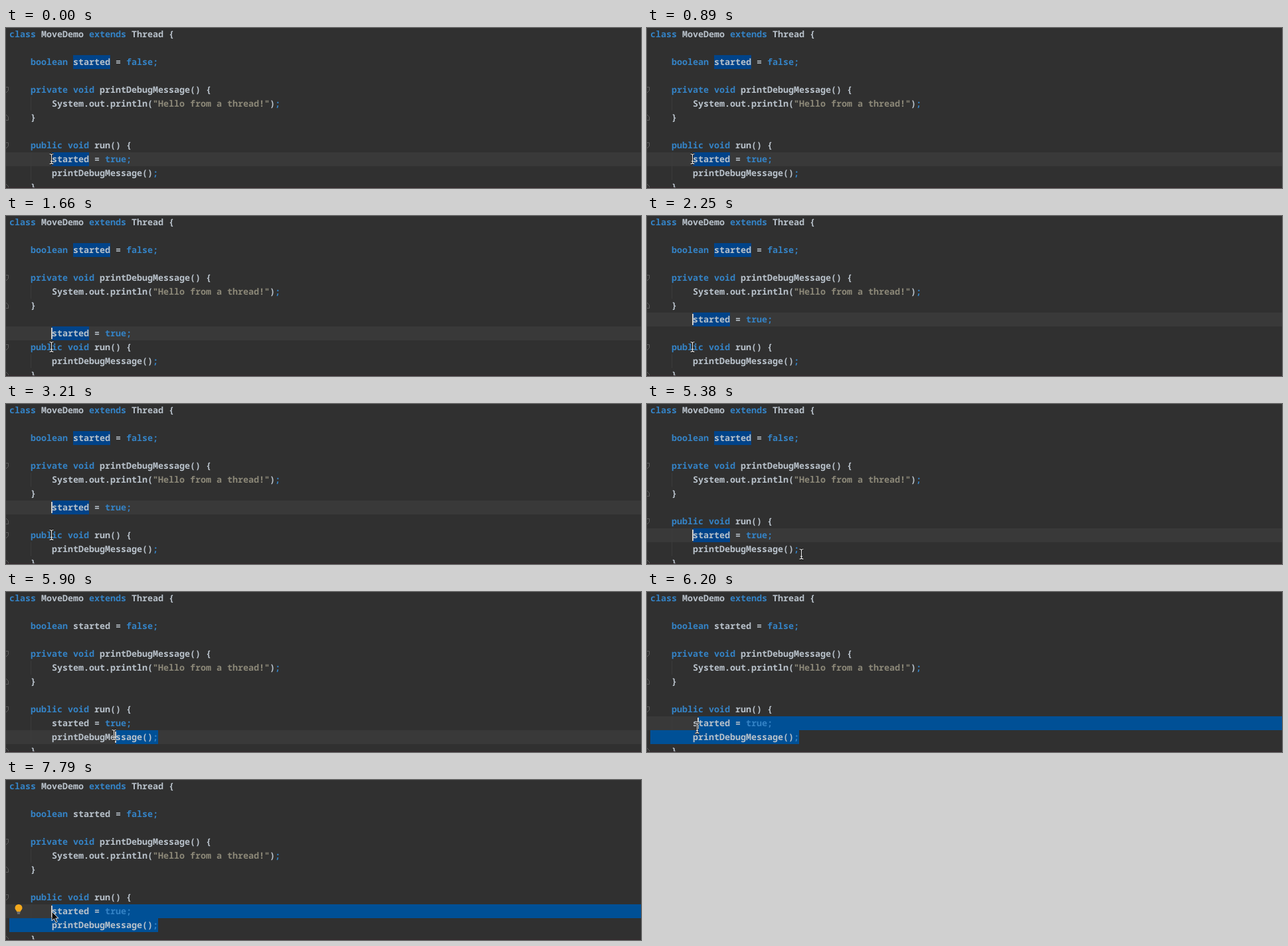
Animation, 956 px wide and 242 px high, one loop 8000 ms. Source, as an HTML page:

```html
<!DOCTYPE html>
<html lang="en">
<head>
<meta charset="utf-8">
<title>Moving a line</title>
<style>
  html, body { margin: 0; width: 100%; height: 100%; overflow: hidden; background: #303030; }
  svg { display: block; }
  text { font: 600 13.333px "Noto Sans Mono", "DejaVu Sans Mono", monospace; white-space: pre; fill: #b9c2cb; text-rendering: geometricPrecision; }
  .key { fill: #3483c6; }
  .str { fill: #8c8878; }
  .mark { fill: #004389; }
  .sel { fill: #005096; }
  .line { fill: #393939; }
  .guide { fill: #3b3b3b; }
  .fold { fill: none; stroke: #5c5c5c; }
</style>
</head>
<body>
<svg id="stage" width="956" height="242" viewBox="0 0 956 242"></svg>
<script>
const LOOP = 8000, PITCH = 21, CHAR = 8, LEFT = 5, WIDTH = 956;
const stage = document.getElementById('stage');
const rowY = row => row * PITCH - 1;
const colX = col => LEFT + col * CHAR;

function add(tag, attrs = {}, parent = stage) {
  const el = document.createElementNS('http://www.w3.org/2000/svg', tag);
  set(el, attrs);
  return parent.appendChild(el);
}
function set(el, attrs) {
  for (const name in attrs) el.setAttribute(name, attrs[name]);
}
function show(el, on) {
  el.style.display = on ? '' : 'none';
}
function box(el, x, y, width, height) {
  set(el, { x, y, width: Math.max(0, width), height });
}
const rect = (cls, x = 0, y = 0, width = 0, height = PITCH) =>
  add('rect', { class: cls, x, y, width, height });

const TOKENS = /(\b(?:class|extends|boolean|private|public|void|true|false)\b|;)|("[^"]*")|[^";]+?(?=\b(?:class|extends|boolean|private|public|void|true|false)\b|[;"]|$)/g;

function code(col, row, source) {
  const g = add('g');
  const text = add('text', { x: colX(col), y: 15 }, g);
  for (const [part, key, str] of source.matchAll(TOKENS)) {
    add('tspan', { class: key ? 'key' : str ? 'str' : '' }, text).textContent = part;
  }
  place(g, row);
  return g;
}
function place(el, row) {
  set(el, { transform: `translate(0 ${rowY(row)})` });
}
function fold(row, down) {
  const d = down ? 'M0 6.5H3.5V11.5L0 15' : 'M0 14.5H3.5V9.5L0 6';
  const el = add('path', { class: 'fold', d });
  place(el, row);
  return el;
}

// Backgrounds
const current = rect('line', 0, 0, WIDTH);
rect('guide', 37, rowY(5), 1);
const bodyGuide = rect('guide', 37, rowY(10), 1);
const gapGuide = rect('guide', 37, rowY(7), 1);
const marks = [rect('mark', colX(12), rowY(2), 56), rect('mark', colX(8), 0, 56)];
const selTop = rect('sel'), selEnd = rect('sel');

// Code
code(0, 0, 'class MoveDemo extends Thread {');
code(4, 2, 'boolean started = false;');
code(4, 4, 'private void printDebugMessage() {');
code(8, 5, 'System.out.println("Hello from a thread!");');
const brace = code(4, 6, '}');
const run = code(4, 8, 'public void run() {');
const started = code(8, 9, 'started = true;');
code(8, 10, 'printDebugMessage();');
code(4, 11, '}');

fold(4, true);
fold(11, false);
const foldUp = fold(6, false), foldDown = fold(8, true);
rect('', 0, 241, WIDTH, 1).style.fill = '#33272b';

const bulb = add('g');
add('path', { d: 'M16 199C16 197 13.5 196.500 13.500 193.500A5.500 5.500 0 0 1 24.500 193.500C24.500 196.500 22 197 22 199Z', fill: '#f4a91d' }, bulb);
add('path', { d: 'M16.500 200H21.500M17 202H21', stroke: '#a0a0a0', 'stroke-width': 1.2 }, bulb);

const caret = rect('', 0, 0, 2, 17);
caret.style.fill = '#cfcfcf';

const beam = add('g', { fill: 'none' });
const beamPath = 'M-3 -7.500Q0 -7.500 0 -5.500Q0 -7.500 3 -7.500M0 -6V6M-3 7.500Q0 7.500 0 5.500Q0 7.500 3 7.500M-1.500 3.500H1.500';
add('path', { d: beamPath, stroke: '#111', 'stroke-width': 3 }, beam);
add('path', { d: beamPath, stroke: '#eee', 'stroke-width': 1.2 }, beam);
const arrow = add('path', {
  d: 'M0 0V14L3.400 10.900L6 16.600L8.300 15.600L5.800 10H10Z',
  transform: 'translate(69 199)', fill: '#0a0a0a', stroke: '#e8e8e8'
});

// time, row of the moved line, row of the run() fold, row of the closing fold
const MOVES = [
  [0, 9, 8, 6], [1660, 8, 9, 6], [2250, 7, 9, 6], [2670, 6, 9, 7], [3210, 7, 9, 8],
  [3270, 7, 9, -9], [3560, 8, 9, 6], [4040, 9, 10, 6], [4340, 9, 8, 6]
];
const BLINK = [[0, 0], [410, 1], [890, 0], [1360, 1], [7320, 0], [7790, 1]];
const BULB = [[0, 0], [7200, 1], [7730, 0], [7790, 1]];
const MOUSE = [
  [4820, 68, 198], [5060, 140, 218], [5240, 220, 234], [5360, 232, 227],
  [5500, 232, 227], [5660, 231, 224], [6200, 75, 206], [6320, 69, 204]
];
const CLICK = 5670, ARROW = 7140;

const at = (table, t) => table.findLast(step => step[0] <= t);

function mouseAt(time) {
  const t = Math.floor((time - 20) / 60) * 60 + 20;
  const i = MOUSE.findIndex(p => p[0] > t);
  if (i === 0) return MOUSE[0].slice(1);
  if (i < 0) return MOUSE.at(-1).slice(1);
  const [t0, x0, y0] = MOUSE[i - 1], [t1, x1, y1] = MOUSE[i];
  const k = (t - t0) / (t1 - t0);
  return [x0 + (x1 - x0) * k, y0 + (y1 - y0) * k];
}

function draw(t) {
  const [, moved, down, up] = at(MOVES, t);
  const [x, y] = mouseAt(t);
  const dragging = t >= CLICK;
  let row = moved, col = 8;

  place(started, moved);
  place(brace, moved <= 6 ? 7 : 6);
  place(run, moved <= 8 ? 9 : 8);
  place(foldDown, down);
  place(foldUp, up);
  show(gapGuide, down === 10);
  const top = moved === 9 ? 9 : 10;
  box(bodyGuide, 37, rowY(top), 1, (11 - top) * PITCH);

  if (dragging) {
    row = y < rowY(10) ? 9 : 10;
    col = Math.min(row === 9 ? 23 : 28, Math.max(8, Math.round((x - LEFT) / CHAR)));
  }
  const cx = colX(col), end = colX(28);
  box(selTop, cx, rowY(9), dragging && row === 9 ? WIDTH - cx : 0, PITCH);
  const from = row === 9 ? LEFT : cx;
  box(selEnd, from, rowY(10), dragging ? end - from : 0, PITCH);

  set(current, { y: rowY(row) });
  set(marks[1], { y: rowY(moved) });
  marks.forEach(m => show(m, !dragging));
  set(caret, { x: cx - 1, y: rowY(row) + 2 });
  show(caret, at(BLINK, t)[1]);
  show(bulb, at(BULB, t)[1]);
  show(arrow, t >= ARROW);
  show(beam, t < ARROW);
  set(beam, { transform: `translate(${Math.round(x) + 0.5} ${Math.round(y)})` });
}

function tick() {
  draw(performance.now() % LOOP);
  requestAnimationFrame(tick);
}
tick();
</script>
</body>
</html>
```
